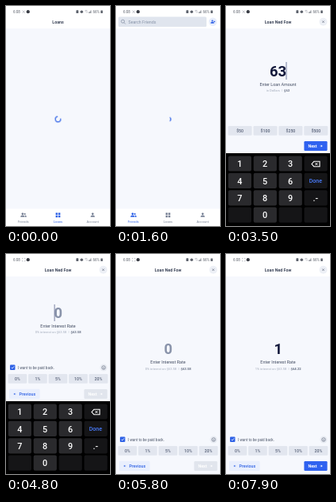
These frames come from a looping animation (131 by 275 pixels, 8 s). An HTML page:

```html
<!DOCTYPE html>
<html lang="en">
<head>
<meta charset="utf-8">
<title>Loan app</title>
<style>
  html, body { margin: 0; width: 100%; height: 100%; overflow: hidden; background: #fff; }
  svg { display: block; width: 100%; height: 100%; }
  text { font-family: Roboto, sans-serif; }
  .mid { text-anchor: middle; }
  .title { font-size: 5.3px; font-weight: 700; fill: #3a4357; text-anchor: middle; }
  .digits { font-size: 18.4px; font-weight: 700; fill: #141a3c; text-anchor: middle; }
  .label { font-size: 5.4px; fill: #414b60; text-anchor: middle; }
  .sub { font-size: 4.15px; fill: #a3abbb; text-anchor: middle; white-space: pre; }
  .sub tspan { font-weight: 700; fill: #626c80; }
  .small { font-size: 4.2px; }
  .btn { font-size: 5.3px; font-weight: 700; }
  .chip { font-size: 5.2px; font-weight: 500; fill: #566077; text-anchor: middle; }
  .key { font-size: 10.8px; font-weight: 500; fill: #fff; text-anchor: middle; }
  .tab { fill: #778195; }
  .on { fill: #2f62e6; }

  .spin { transform-origin: 65.5px 141.5px; animation: turn 8s infinite; }
  .arc { fill: none; stroke: #2f62e6; stroke-width: 1.2; animation: dash 8s infinite; }
  .screen { animation: rise 8s infinite; }
  .center { animation: center 8s infinite; }
  .bottom, .white { animation: bottom 8s infinite; }
  .pad { animation: pad 8s infinite; }

  @keyframes turn {
    0% { transform: rotate(-15deg); animation-timing-function: linear; }
    20% { transform: rotate(675deg); animation-timing-function: linear; }
    22.5%, 100% { transform: rotate(765deg); }
  }
  @keyframes dash {
    0% { stroke-dasharray: 78 100; }
    8.5% { stroke-dasharray: 8 100; }
    14% { stroke-dasharray: 75 100; }
    20% { stroke-dasharray: 25 100; }
    22.5%, 100% { stroke-dasharray: 8 100; }
  }
  @keyframes rise {
    0%, 31.25% { transform: translateY(24px); animation-timing-function: ease-out; }
    35%, 100% { transform: none; }
  }
  @keyframes center {
    0%, 37.5% { transform: translateY(45px); }
    40%, 61.25% { transform: none; }
    65%, 100% { transform: translateY(45.6px); }
  }
  @keyframes bottom {
    0%, 61.25% { transform: none; }
    65%, 100% { transform: translateY(90px); }
  }
  @keyframes pad {
    0%, 37.5% { transform: translateY(91px); }
    40%, 61.25% { transform: none; }
    65%, 100% { transform: translateY(91px); }
  }
</style>
</head>
<body>
<!-- data-at: alternating on and off times in ms; data-fade: length of each fade -->
<svg viewBox="0 0 131 275" preserveAspectRatio="none">
  <defs>
    <g id="person">
      <circle cy="-1.5" r="1.35"/>
      <path d="M-2.6 2.5v-.8q0-1.5 2.6-1.5t2.6 1.5v.8z"/>
    </g>
    <g id="friends">
      <use href="#person" x="-.9"/>
      <circle cx="1.9" cy="-1.3" r="1.1"/>
      <path d="M2 .3q2 .2 2 1.4v.8h-1.8z"/>
    </g>
    <path id="grid" d="M-2.9-2.9h2.5v2.5h-2.5zM.4-2.9h2.5v2.5h-2.5zM-2.9.4h2.5v2.5h-2.5zM.4.4h2.5v2.5h-2.5z"/>
    <path id="arrow" d="M-1.6-.3h1.4v-1.2l1.8 1.5-1.8 1.5v-1.2h-1.4z"/>
    <g id="next">
      <rect x="98.4" y="169" width="29.2" height="12" rx="1.3"/>
      <text class="btn" x="103.5" y="176.8" fill="#fff">Next</text>
      <use href="#arrow" x="120" y="175" fill="#fff"/>
    </g>
  </defs>

  <rect width="131" height="275" fill="#fff"/>
  <rect y="28" width="131" height="247" fill="#f6f8fd"/>

  <g data-at="0 1000"><text class="title" x="65.5" y="21.8">Loans</text></g>

  <g data-at="1000 2800">
    <rect x="3" y="13.5" width="111" height="12.5" rx="1.5" fill="#e0e5ee"/>
    <g fill="none" stroke="#7d899e" stroke-width=".7">
      <circle cx="8.6" cy="19.2" r="2"/><path d="M10.1 20.7l1.8 1.8"/>
    </g>
    <text x="15.5" y="21.8" font-size="5.3" fill="#8793a8">Search Friends</text>
    <circle cx="122" cy="19.7" r="5.2" fill="#e8eefc"/>
    <g class="on"><use href="#person" transform="translate(121.4 19.7) scale(.8)"/><path d="M123.7 18.4h.6v.7h.7v.6h-.7v.7h-.6v-.7h-.7v-.6h.7z"/></g>
  </g>

  <g data-at="0 1800"><g class="spin"><circle class="arc" cx="65.5" cy="141.5" r="3.3" pathLength="100"/></g></g>

  <rect y="253.5" width="131" height="21.5" fill="#fff"/>
  <g id="tabs"></g>

  <g data-at="2500 8000" data-fade="250"><g class="screen">
    <rect width="131" height="300" fill="#fff"/>
    <rect y="28" width="131" height="272" fill="#f6f8fd"/>
    <g data-at="2500 5300"><rect class="white" y="184.5" width="131" height="115" fill="#fff"/></g>
    <text class="title" x="65.5" y="21.8">Loan Ned Fow</text>
    <circle cx="122.5" cy="19.7" r="5" fill="#edf0f6"/>
    <path d="M121.3 18.5l2.4 2.4m0-2.4l-2.4 2.4" stroke="#4a5468" stroke-width=".6"/>

    <g data-at="0 4100" data-fade="250">
      <g class="center">
        <g id="amounts"></g>
        <text class="label" x="65.5" y="100">Enter Loan Amount</text>
      </g>
      <g data-at="3050 8000" data-fade="100">
        <g id="sums"></g>
        <g data-at="0 3400"><use href="#next" fill="#e1e5ed"/></g>
        <g data-at="3400 8000"><use href="#next" fill="#2f62f0"/></g>
      </g>
    </g>

    <g data-at="4100 8000" data-fade="250">
      <g class="center">
        <g data-at="0 6300">
          <text class="digits" x="65.7" y="79.6" style="fill:#8993aa">0</text>
          <text class="sub" x="65.7" y="99">0% interest on $63.58  |  <tspan>$63.58</tspan></text>
        </g>
        <g data-at="6300 8000">
          <text class="digits" x="65.7" y="79.6">1</text>
          <text class="sub" x="65.7" y="99">1% interest on $63.58  |  <tspan>$64.22</tspan></text>
        </g>
        <g data-at="0 5500" data-fade="280"><rect x="60.7" y="63" width=".8" height="21" fill="#5a658c"/></g>
        <text class="label" x="65.5" y="91.5">Enter Interest Rate</text>
      </g>
      <g class="bottom">
        <rect x="5" y="138.5" width="6.5" height="6.5" rx="1" fill="#2f62e6"/>
        <path d="M6.6 141.8l1.3 1.3 2.3-2.7" fill="none" stroke="#fff" stroke-width=".8"/>
        <text x="15" y="143.6" font-size="4.6" fill="#4b5569">I want to be paid back.</text>
        <circle cx="123" cy="142" r="4.6" fill="#e9ecf3"/>
        <g fill="none" stroke="#5f697d" stroke-width=".6">
          <circle cx="123" cy="142" r="2.3"/><path d="M121.9 142.6q1.1 1.1 2.2 0M122.2 140.9v.6M123.8 140.9v.6"/>
        </g>
        <g id="rates"></g>
        <rect x="4" y="168.7" width="38.6" height="12.3" rx="1.3" fill="#e9effd"/>
        <g class="on">
          <use href="#arrow" transform="translate(11 175) scale(-.9 .9)"/>
          <text class="btn" x="16.6" y="176.8" style="font-weight:500">Previous</text>
        </g>
        <g data-at="0 6300"><use href="#next" fill="#e1e5ed"/></g>
        <g data-at="6300 8000"><use href="#next" fill="#2f62f0"/></g>
      </g>
    </g>

    <g data-at="3000 5250"><g class="pad">
      <rect y="184" width="131" height="91" fill="#000"/>
      <g id="keys"></g>
      <path d="M107.9 197.5l2.9-3.2h7.2v6.4h-7.2z" fill="none" stroke="#fff" stroke-width="1.1"/>
      <path d="M112.3 195.9l3.2 3.2m0-3.2l-3.2 3.2" stroke="#fff"/>
    </g></g>
  </g></g>

  <g fill="#5c616b">
    <text x="9" y="8.9" font-size="4.6">6:08</text>
    <g fill="none" stroke="#7c818b" stroke-width=".45">
      <path data-at="0 1900 3300 4000 6100 6300 6500 6600 6900 7300 7600 7900" d="M20.7 5.5l3.2 3.4m0-3.4l-3.2 3.4"/>
      <path data-at="1900 3300 4000 6100 6300 6500 6600 6900 7300 7600 7900 8000" d="M20.5 6.4v-1h1M23.1 5.4h1v1M24.1 8v1h-1M21.5 9h-1v-1"/>
      <path d="M99.2 6q1.7-1.3 3.4 0M100 7.2q.9-.7 1.8 0M101.8 8.8l1.5-1.7"/>
    </g>
    <circle cx="27.8" cy="7.2" r="2.1" fill="#3a3d45"/>
    <rect x="88.4" y="5.3" width="2.9" height="3.8" rx=".6"/>
    <circle cx="95.3" cy="7.2" r="1.8"/>
    <path d="M104.4 9v-1.2h.7v1.2zM105.5 9v-2.2h.7v2.2zM106.6 9v-3.4h.7v3.4z"/>
    <text x="109.4" y="8.9" font-size="4.5">66%</text>
    <rect x="119.3" y="5.4" width="2.5" height="3.7" rx=".5"/>
  </g>
</svg>
<script>
  const LOOP = 8000;
  const put = (id, html) => document.getElementById(id).innerHTML = html;

  const tabs = [["friends", "Friends", 21.8], ["grid", "Loans", 65.5], ["person", "Account", 109.2]];
  const tabBar = active => tabs.map(([icon, name, x], i) =>
    `<g class="tab ${i === active ? "on" : ""}"><use href="#${icon}" x="${x}" y="261.3"/>
     <text class="small mid" x="${x}" y="270.8">${name}</text></g>`).join("");
  put("tabs", `<g data-at="0 1000">${tabBar(1)}</g><g data-at="1000 8000">${tabBar(0)}</g>`);

  const chips = (names, step, width) => names.map((name, i) => {
    const x = 2.6 + i * step;
    return `<rect x="${x}" y="150" width="${width}" height="11.8" rx="1.3" fill="#e2e6ef"/>
      <text class="chip" x="${x + width / 2}" y="157.8">${name}</text>`;
  }).join("");
  put("sums", chips(["$50", "$100", "$250", "$500"], 31.9, 30));
  put("rates", chips(["0%", "1%", "5%", "10%", "20%"], 25.5, 23.7));

  // the amount is typed one key every 100 ms
  const typed = ["0", "6", "63", "63.", "63.5", "63.58"];
  put("amounts", typed.map((value, i) => {
    const from = i ? 3300 + i * 100 : 0;
    const to = i === typed.length - 1 ? LOOP : 3400 + i * 100;
    const half = [...value].reduce((sum, c) => sum + (c === "." ? 5.3 : 10.5), 0) / 2;
    const caret = i ? `<rect x="${65.1 + half}" y="70" width=".8" height="22" fill="#55608a"/>` : "";
    return `<g data-at="${from} ${to}">
      <text class="digits" x="65.5" y="88.4" ${i ? "" : 'style="fill:#8787ac"'}>${value}</text>${caret}
      <text class="sub" x="65.5" y="107.2">in Dollars  |  <tspan>$${value}</tspan></text></g>`;
  }).join(""));

  const keys = ["1", "2", "3", "", "4", "5", "6", "Done", "7", "8", "9", ".-", "", "0", "", ""];
  put("keys", keys.map((name, i) => {
    const x = 2.8 + i % 4 * 31.9, y = 187.4 + Math.floor(i / 4) * 21.4;
    const dim = i % 4 === 3 || (i > 11 && !name);
    const look = name === "Done" ? 'style="font-size:7px;fill:#4a7dff"' : "";
    return `<rect x="${x}" y="${y}" width="29.2" height="19.2" rx="2" fill="${dim ? "#151517" : "#2a2a2d"}"/>
      <text class="key" x="${x + 14.4}" y="${y + (look ? 12.4 : 13.8)}" ${look}>${name}</text>`;
  }).join(""));

  for (const el of document.querySelectorAll("[data-at]")) {
    const fade = +el.dataset.fade || 0;
    const frames = [{ opacity: 0, offset: 0 }];
    el.dataset.at.split(" ").forEach((time, i) => {
      const on = i % 2 === 0;
      const start = +time / LOOP, end = time > 0 ? Math.min(1, (+time + fade) / LOOP) : 0;
      frames.push({ opacity: on ? 0 : 1, offset: start }, { opacity: on ? 1 : 0, offset: end });
    });
    frames.push({ opacity: frames.at(-1).opacity, offset: 1 });
    el.animate(frames, { duration: LOOP, iterations: Infinity });
  }
</script>
</body>
</html>
```
